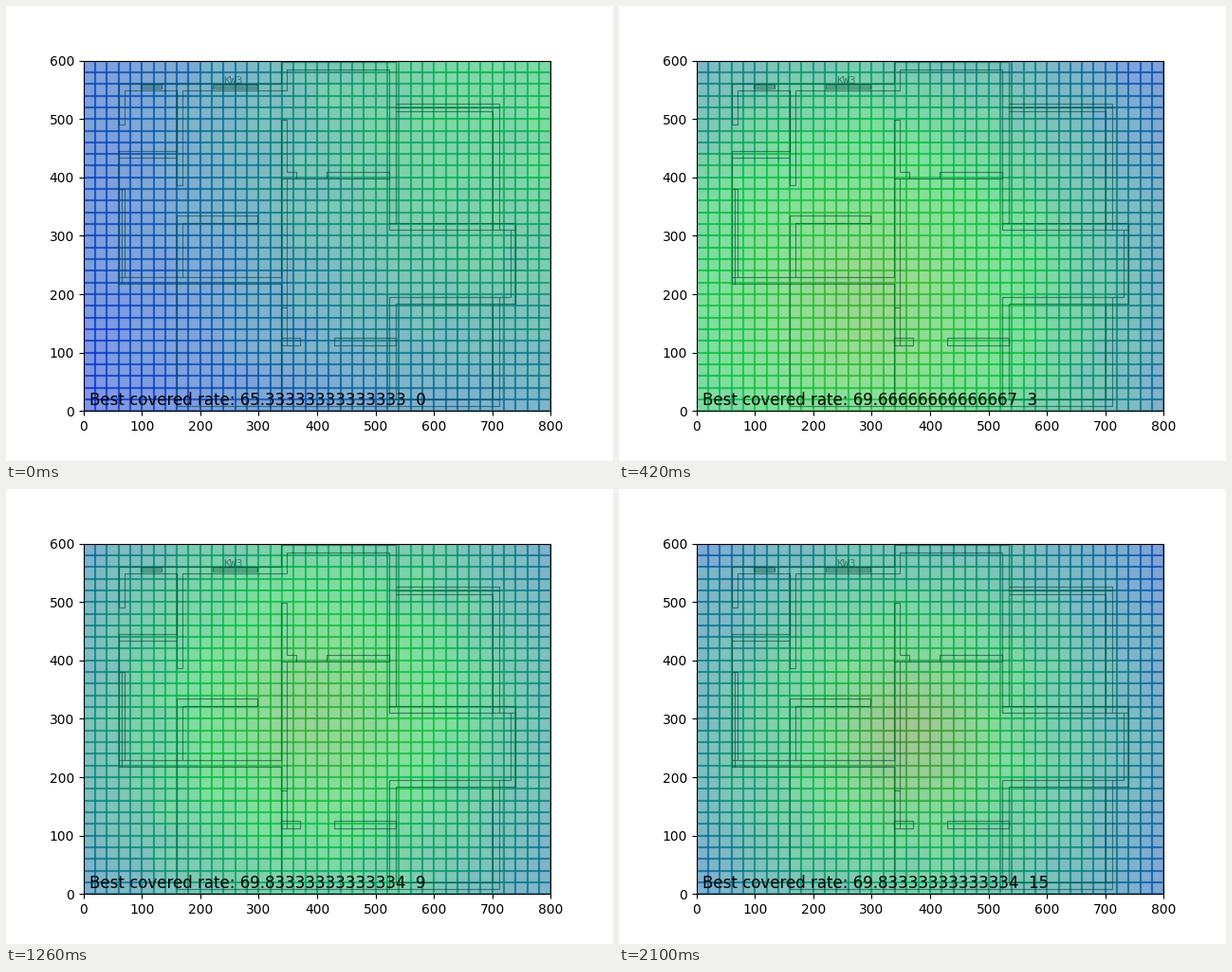
Animation, 640 px wide and 480 px high, one loop 2240 ms. Source, as a matplotlib script:

```python
import numpy as np
import matplotlib.pyplot as plt
from matplotlib.animation import FuncAnimation
from matplotlib.collections import LineCollection, PatchCollection
from matplotlib.patches import Rectangle

FRAMES, STEP = 16, 140
W, H, CELL = 800, 600, 20
FLOOR = .1

# generation: centre x, centre y, spread, peak, heat
KEYS = {
    0: (720, 520, 440, .70, 0),
    1: (580, 420, 350, .97, 0),
    3: (290, 190, 370, .96, .10),
    5: (430, 310, 360, .95, .22),
    9: (400, 310, 360, .86, .12),
    13: (400, 310, 345, .83, .20),
    15: (365, 275, 335, .80, .24),
}


def trace(x, y, *stops, up=False):
    """Walk from x, y with alternating level and upright moves."""
    path = [(x, y)]
    for stop in stops:
        x, y = (x, stop) if up else (stop, y)
        path.append((x, y))
        up = not up
    return path


def box(x0, y0, x1, y1):
    return trace(x0, y0, x1, y1, x0, y0)


def floor_plan():
    shell = [
        trace(61, 490, 561, 338, 597, 534, 322, 740, 183, 534, 20, 711, up=True),
        trace(61, 490, 70, 549, 160, 387, 170, 549, 348, 585, 523, 311, 731,
              195, 523, 8),
        trace(711, 195, 8, 160, 334, 298, 322, 170, 230, up=True),
    ]
    rooms = [
        trace(160, 549, 445, 61, 218, 338, 8, up=True),
        trace(61, 433, 160),
        trace(61, 230, 338, 498, 348, 410, 365, 398),
        trace(338, 398, 523, 410, 416, 398),
        trace(348, 398, 113, up=True),
        trace(338, 178, 348),
        trace(523, 322, 534),
        trace(731, 311, 740),
        trace(701, 183, 20, up=True),
        box(338, 113, 370, 125),
        box(430, 113, 534, 125),
    ]
    windows = [
        trace(61, 380, 70, 230),
        trace(65, 380, 218, up=True),
        trace(534, 526, 711, 311),
        trace(534, 520, 711),
        trace(534, 514, 701, 311),
    ]
    for x0, x1 in ((98, 134), (221, 298)):
        windows += [box(x0, 553, x1, 558), trace(x0, 555.5, x1)]
    return shell + rooms + windows


xs, ys = np.meshgrid(np.arange(0, W, CELL), np.arange(0, H, CELL))


def bump(cx, cy, spread):
    dx, dy = xs + CELL / 2 - cx, ys + CELL / 2 - cy
    return np.exp(-(dx ** 2 + dy ** 2) / (2 * spread ** 2))


def cell_colors(i):
    cx, cy, spread, peak, heat = (np.interp(i, list(KEYS), col)
                                  for col in zip(*KEYS.values()))
    noise = np.random.default_rng(i).normal(0, .014, (H // 40, W // 40))
    t = FLOOR + (peak - FLOOR) * bump(cx, cy, spread)
    t = np.clip(t + np.kron(noise, np.ones((2, 2))), 0, 1)
    over = np.clip(t - .75, 0, 1)
    hot = heat * bump(cx, cy, 90)
    red = (1 - hot) * .6 * over + hot
    green = (1 - hot) * (t - .9 * over)
    blue = (1 - hot) * (1 - t + .6 * over)
    rgba = np.stack([red, green, blue, np.full_like(t, .5)], -1)
    return np.clip(rgba, 0, 1).reshape(-1, 4)


def best_rate(i):
    if i < 2:
        return (65.33333333333333, 66.0)[i]
    return 69.66666666666667 if i < 7 else 69.83333333333334


fig, ax = plt.subplots(figsize=(6.4, 4.8), dpi=100)
ax.set_xlim(0, W)
ax.set_ylim(0, H)
ax.set_aspect("equal")

cells = PatchCollection([Rectangle(corner, CELL, CELL)
                         for corner in zip(xs.flat, ys.flat)],
                        linewidths=1.5, zorder=1)
ax.add_collection(cells, autolim=False)

ink = dict(color="#004838", alpha=.6)
ax.add_collection(LineCollection(floor_plan(), linewidths=.85, zorder=1.5, **ink),
                  autolim=False)
ax.text(256, 566, "KW3", family="DejaVu Sans Mono", fontsize=8.2,
        ha="center", va="center", zorder=1.6, **ink)
label = ax.text(10, 10, "", fontsize=12, color="black", zorder=3)


def update(i):
    colors = cell_colors(i)
    cells.set_facecolor(colors)
    cells.set_edgecolor(colors)
    label.set_text(f"Best covered rate: {best_rate(i)}  {i}")
    return cells, label


anim = FuncAnimation(fig, update, frames=FRAMES, interval=STEP,
                     init_func=lambda: update(0), repeat=True, repeat_delay=0)
plt.show()
```
